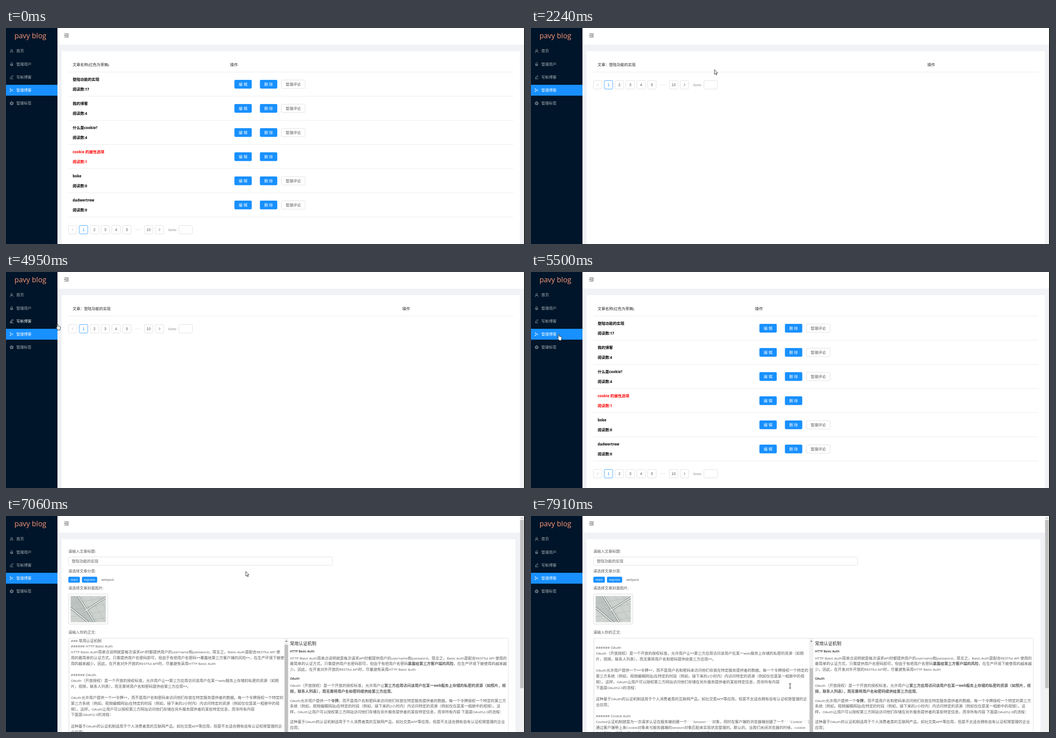
An HTML page that plays this animation: 1160 by 483 pixels, repeating every 7.99 s.

```html
<!DOCTYPE html>
<html lang="zh-CN">
<head>
<meta charset="utf-8">
<title>Blog admin</title>
<style>
html, body { margin: 0; width: 100%; height: 100%; overflow: hidden; background: #fff; }
svg { display: block; width: 1160px; height: 483px; }
text { font-family: "Open Sans", "Noto Sans CJK SC", "Noto Sans CJK", sans-serif; white-space: pre; }
.num { font-family: "Liberation Sans", Arial, sans-serif; }
</style>
</head>
<body>
<svg id="stage" viewBox="0 0 1160 483" xmlns="http://www.w3.org/2000/svg"></svg>
<script>
const LOOP = 7990, BLUE = '#1890ff', GREY = '#595959', BORDER = '#d9d9d9';
const stage = document.getElementById('stage');

// ---------- drawing helpers ----------
const rect = (x, y, w, h, fill, extra = '') =>
  `<rect x="${x}" y="${y}" width="${w}" height="${h}" fill="${fill}" ${extra}/>`;
const path = (d, extra = '') => `<path d="${d}" ${extra}/>`;
const line = (d, stroke, width) => path(d, `fill="none" stroke="${stroke}" stroke-width="${width}"`);
const box = (x, y, w, h, stroke = BORDER, fill = '#fff') =>
  rect(x, y, w, h, fill, `rx="2.2" stroke="${stroke}" stroke-width=".8"`);
const triangleUp = (x, y, fill) => path(`M${x - 2.3} ${y}l2.3 -2.6l2.3 2.6Z`, `fill="${fill}"`);

// Latin runs are set a little smaller than the Han characters beside them.
function runs(str, size) {
  const safe = str.replace(/&/g, '&amp;').replace(/</g, '&lt;');
  return safe.replace(/[\x20-\x7e]+/g, s => `<tspan font-size="${(size * 0.94).toFixed(2)}">${s}</tspan>`);
}
function text(x, cy, str, { size = 8.5, fill = GREY, weight = 400, anchor = 'start', bold = false } = {}) {
  const body = bold
    ? str.split('**').map((s, i) => `<tspan font-weight="${i % 2 ? 700 : 400}">${runs(s, size)}</tspan>`).join('')
    : runs(str, size);
  return `<text x="${x}" y="${cy + size * 0.37}" font-size="${size}" fill="${fill}" font-weight="${weight}" text-anchor="${anchor}">${body}</text>`;
}
const number = (x, cy, str, fill) =>
  `<text class="num" x="${x}" y="${cy + 3.1}" font-size="8.5" fill="${fill}" text-anchor="middle">${str}</text>`;

// ---------- frame of the page ----------
const ring = (x, y, r) => `M${x - r} ${y}a${r} ${r} 0 1 0 ${2 * r} 0a${r} ${r} 0 1 0 ${-2 * r} 0`;
const corner = (i, r) => {
  const a = i * Math.PI * 0.4;
  return `${(r * Math.sin(a)).toFixed(2)} ${(-r * Math.cos(a)).toFixed(2)}`;
};
const pentagon = r => 'M' + [0, 1, 2, 3, 4].map(i => corner(i, r)).join('L') + 'Z';
const spokes = [0, 1, 2, 3, 4].map(i => `M${corner(i, 2)}L${corner(i, 4)}`).join('');

const menu = [
  ['首页', 'M-3.5 4a3.5 3.4 0 0 1 7 0' + ring(0, -1.6, 2)],
  ['管理用户', 'M-1.7 1.5V-2Q0 -5.6 1.7 -2V1.5ZM-1.7 0L-3 2.6H3L1.7 0M-.8 4H.8'],
  ['写新博客', 'M-3.8 3.8H3.8M-2.7 2L-2.3 .2L2 -4L3.6 -2.4L-.8 1.7Z'],
  ['管理博客', 'M-2 -2L3.5 2.2M-2 2L3.5 -2.2' + ring(-2.8, -2.6, 1.1) + ring(-2.8, 2.6, 1.1)],
  ['管理标签', pentagon(4) + pentagon(2) + spokes]
];
const SELECTED = 3;
const menuY = i => 51.2 + 29.2 * i;

const sidebar = () => rect(0, 0, 115, 483, '#001529') + rect(0, 127, 115, 24.3, BLUE) +
  text(54.5, 17, 'pavy blog', { size: 17, fill: '#fa9778', anchor: 'middle' }) +
  menu.map(([label, icon], i) => `<g class="menu"><g transform="translate(12.6 ${menuY(i) + .3})">` +
    line(icon, '#fff', .8) + '</g>' +
    text(23, menuY(i), label, { fill: '#fff', weight: i === SELECTED ? 500 : 400 }) + '</g>').join('');

const header = () => rect(115, 0, 1045, 483, '#f0f2f5') + rect(115, 0, 1043, 37.3, '#fff') + '<g id="fold">' +
  [0, 1, 2, 3].map(i => line(`M${i % 3 ? 134 : 130.3} ${12.9 + 2.5 * i}H140.2`, 'currentColor', .9)).join('') +
  path('M130.2 16.6l2.6 -1.9v3.8Z', 'fill="currentColor"') + '</g>';

// ---------- table pages ----------
const rule = y => rect(139, y, 995, .8, '#e8e8e8');
const tableHead = (title, actionX) => rect(124.5, 51.8, 1024, 432, '#fff') +
  text(149, 82.3, title, { fill: '#262626' }) + text(actionX, 82.3, '操作', { fill: '#262626' }) + rule(98);

function pagination(y) {
  const cy = y + 9.8;
  const slot = i => 139.5 + 24.25 * i;
  const cells = ['', '1', '2', '3', '4', '5', null, '10', ''].map((label, i) => {
    if (label === null) return [-4, 0, 4].map(d => `<circle cx="${294.8 + d}" cy="${cy}" r=".8" fill="#bfbfbf"/>`).join('');
    const on = i === 1;
    return box(slot(i), y + .3, 19, 19, on ? BLUE : BORDER) + number(slot(i) + 9.5, cy, label, on ? BLUE : GREY);
  }).join('');
  const chevron = (x, dx, stroke) => line(`M${x} ${cy - 2.7}l${dx} 2.7l${-dx} 2.7`, stroke, .9);
  return cells + chevron(150.6, -3, '#bfbfbf') + chevron(341.6, 3, GREY) +
    text(362.5, cy, 'Goto', { fill: '#7a7a7a' }) + box(386.5, y + .3, 30, 19);
}

const posts = [['登陆功能的实现', 17], ['我的博客', 4], ['什么是cookie?', 4], ['cookie 的属性选项', 1, true], ['boke', 0], ['dadwertrew', 0]];

function button(x, y, w, label, primary, id = '') {
  return `<g ${id && `id="${id}"`} style="color:${primary ? BLUE : GREY}">` +
    (primary ? rect(x, y, w, 19.4, 'currentColor', 'rx="2.4"') : box(x + .4, y + .4, w - .8, 18.6)) +
    text(x + w / 2, y + 9.8, label, { fill: primary ? '#fff' : 'currentColor', weight: primary ? 500 : 400, anchor: 'middle' }) + '</g>';
}

const listPage = () => tableHead('文章名称(红色为草稿)', 501) + posts.map(([title, reads, draft], i) => {
  const y = 98 + 54 * i, style = { fill: draft ? '#f00' : '#000', weight: 700 };
  return text(149, y + 17.2, title, style) + text(149, y + 38.4, '阅读数:' + reads, style) +
    button(510.5, y + 18, 38.8, '编 辑', true, i ? '' : 'edit') + button(567.5, y + 18, 38.8, '删 除', true) +
    (draft ? '' : button(615, y + 18, 54, '管理评论', false, i ? '' : 'comment')) + rule(y + 54);
}).join('') + pagination(441.2);

const commentPage = () => tableHead('文章：登陆功能的实现', 886) + pagination(117.2);

// ---------- editor page ----------
const source = `### 常用认证机制
###### HTTP Basic Auth
HTTP Basic Auth简单点说明就是每次请求API时都提供用户的username和password，简言之，Basic Auth是配合RESTful API 使
用的最简单的认证方式，只需提供用户名密码即可，但由于有把用户名密码**暴露给第三方客户端的风险**，在生产环境下被使
用的越来越少。因此，在开发对外开放的RESTful API时，尽量避免采用HTTP Basic Auth

###### OAuth
OAuth（开放授权）是一个开放的授权标准，允许用户让**第三方应用访问该用户在某一web服务上存储的私密的资源（如照
片，视频，联系人列表），而无需将用户名和密码提供给第三方应用**。

OAuth允许用户提供一个**令牌**，而不是用户名和密码来访问他们存放在特定服务提供者的数据。每一个令牌授权一个特定的
第三方系统（例如，视频编辑网站)在特定的时段（例如，接下来的2小时内）内访问特定的资源（例如仅仅是某一相册中的视
频）。这样，OAuth让用户可以授权第三方网站访问他们存储在另外服务提供者的某些特定信息，而非所有内容
下面是OAuth2.0的流程：

这种基于OAuth的认证机制适用于个人消费者类的互联网产品，如社交类APP等应用，但是不太适合拥有自有认证权限管理的企
业应用；

###### Cookie Auth
Cookie认证机制就是为一次请求认证在服务端创建一个\`\`\`Session\`\`\`对象，同时在客户端的浏览器端创建了一个\`\`\`Cookie\`\`\`对象;
通过客户端带上来Cookie对象来与服务器端的session对象匹配来实现状态管理的。默认的，当我们关闭浏览器的时候，cookie
会被删除。但可以通过修改cookie 的expire time使cookie在一定时间内有效`.split('\n');

const preview = [
  [317.5, `HTTP Basic Auth简单点说明就是每次请求API时都提供用户的username和password，简言之，Basic Auth是配合RESTful API 使用的
最简单的认证方式，只需提供用户名密码即可，但由于有把用户名密码**暴露给第三方客户端的风险**，在生产环境下被使用的越来越
少。因此，在开发对外开放的RESTful API时，尽量避免采用HTTP Basic Auth`],
  [379, `OAuth（开放授权）是一个开放的授权标准，允许用户让**第三方应用访问该用户在某一web服务上存储的私密的资源（如照片，视**
**频，联系人列表），而无需将用户名和密码提供给第三方应用。**`],
  [412.5, `OAuth允许用户提供一个**令牌**，而不是用户名和密码来访问他们存放在特定服务提供者的数据。每一个令牌授权一个特定的第三方
系统（例如，视频编辑网站)在特定的时段（例如，接下来的2小时内）内访问特定的资源（例如仅仅是某一相册中的视频）。这
样，OAuth让用户可以授权第三方网站访问他们存储在另外服务提供者的某些特定信息，而非所有内容 下面是OAuth2.0的流程：`],
  [460, `这种基于OAuth的认证机制适用于个人消费者类的互联网产品，如社交类APP等应用，但是不太适合拥有自有认证权限管理的企业
应用；`]
];
const LINE = 12.75;

function photo() {
  const beams = 'M161 179L198 238M144 205L184 238M223 182L175 213';
  const grid = [0, 1, 2, 3].map(i => `M144 ${196 + 15 * i}l80 -14M${152 + 18 * i} 179l34 59`).join('');
  return '<g clip-path="url(#photoClip)">' + rect(144, 179, 80, 59, '#cdd2cf') +
    path('M144 179H161L198 238H184L144 205Z', 'fill="#bcc3c0"') +
    line(grid, '#a9b1ae', .6) + line(beams, '#6c7776', 4.4) + line(beams, '#eceeea', 2.4) + '</g>';
}

function tag(x, w, label) {
  return rect(x, 135.7, w, 13.2, BLUE, 'rx="2.2"') +
    text(x + w / 2, 142.3, label, { size: 7.3, fill: '#fff', weight: 500, anchor: 'middle' });
}

const editorForm = () => rect(1138.5, 37.3, 10, 446, '#f0f2f5') + rect(124.5, 51.8, 1014, 432, '#fff') +
  rect(1148.3, 0, 9.7, 483, '#f1f1f1') + rect(1149.2, 9, 7.9, 376, '#c1c1c1') + triangleUp(1153.2, 6, '#a3a3a3') +
  text(139.3, 78.8, '请输入文章标题:') + box(139.5, 91.5, 590, 18.6) + text(147, 101, '登陆功能的实现') +
  text(139.3, 123.2, '请选择文章分类:') + tag(139.3, 25.8, 'react') + tag(169.8, 34, 'express') +
  text(213, 142.3, 'webpack', { size: 7.3 }) +
  text(139.3, 161.3, '请选择文章封面图片:') + box(139.7, 174, 88, 68, BORDER, '#fafafa') + photo();

const subhead = (y, label) => text(634.7, y, label, { size: 7.4, fill: '#262626', weight: 600 });
const lines = (x, y, rows, style) => rows.map((row, i) => text(x, y + LINE * i, row, style)).join('');

const editorBody = () => text(139.3, 260.2, '请输入你的正文:') + box(139.7, 273.3, 983, 240) +
  line('M142.2 274V483', '#e3e3e3', .7) +
  `<g clip-path="url(#sourceClip)"><g id="source">${lines(145, 278.5, source)}</g></g>` +
  rect(622, 274, 9, 209, '#f1f1f1') + triangleUp(626.6, 281, '#505050') +
  rect(622.6, 0, 7.9, 240, '#c1c1c1', 'id="thumb"') +
  text(634.7, 285.2, '常用认证机制', { size: 9.8, fill: '#262626', weight: 500 }) +
  subhead(302.3, 'HTTP Basic Auth') + subhead(363.4, 'OAuth') +
  preview.map(([y, para]) => lines(634.7, y, para.split('\n'), { bold: true })).join('');

// ---------- pointer ----------
const solid = d => path(d, 'fill="#fff" stroke="#000" stroke-width=".8"');
const pointerShapes = {
  arrow: solid('M0 0V10.4L2.4 8.3L4 11.9L5.6 11.2L4 7.7H7.2Z'),
  hand: solid('M-1 1Q0 -.6 1.1 1V4.6L5.6 5.8Q7 6.4 6.8 8L5.9 11.6V14H0V12.2L-3 8.4Q-2.6 6.6 -1 8.2Z'),
  beam: line('M-2.3 -5H2.3M0 -5V5M-2.3 5H2.3', '#000', .9)
};

// Each move: start, end, then waypoints as [step, x, y].
const moves = [
  [290, 980, [1, 1040, 456], [7, 590, 128], [10, 622, 101]],
  [1150, 1470, [5, 642, 122]],
  [2170, 2940, [2, 410, 93], [11, 139, 20]],
  [3020, 3170, [3, 138, 22]],
  [3400, 4180, [3, 86, 41], [11, 50, 140]],
  [4260, 4260, [1, 49, 139]],
  [4640, 5410, [2, 78, 121], [5, 115, 116], [11, 62, 139]],
  [5730, 6510, [3, 210, 192], [9, 546, 133], [11, 541, 124]],
  [6580, 6900, [1, 539, 119], [5, 536, 117]],
  [7060, 7060, [1, 536, 124]],
  [7210, 7910, [7, 573, 373], [10, 579, 380]]
];
const clamp = u => Math.max(0, Math.min(1, u));

// The screen was sampled about every 78 ms, so the pointer moves in steps.
function stepAt(t, start, end) {
  const gaps = Math.round((end - start) / 77.5);
  return gaps ? Math.min(gaps + 1, Math.floor((t - start) / (end - start) * gaps + 1.2)) : 1;
}

function pointerAt(t) {
  let at = null;
  for (const [start, end, ...points] of moves) {
    if (t < start) break;
    const step = stepAt(t, start, end);
    let from = [0, ...(at || points[0].slice(1))];
    for (const to of points) {
      const u = clamp((step - from[0]) / (to[0] - from[0]));
      at = [from[1] + (to[1] - from[1]) * u, from[2] + (to[2] - from[2]) * u];
      if (step <= to[0]) break;
      from = to;
    }
  }
  return at;
}

const pageAt = t => t < 1700 ? 'list' : t < 5500 ? 'comments' : t < 7060 ? 'list' : 'editor';
const inside = (p, x, y, w, h) => p && p[0] >= x && p[0] <= x + w && p[1] >= y && p[1] <= y + h;
const targets = {
  fold: p => inside(p, 128, 10, 15, 16),
  edit: (p, page) => page === 'list' && inside(p, 510, 116, 39, 19.4),
  comment: (p, page) => page === 'list' && inside(p, 615, 116, 54, 19.4)
};
menu.forEach((_, i) => { targets['menu' + i] = p => inside(p, 0, menuY(i) - 12.2, 117, 24.4); });

// Hover colours fade over 300 ms, so average the recent hover state.
function hover(name, t) {
  let sum = 0;
  for (let i = 0; i < 6; i++) sum += targets[name](pointerAt(t - i * 50), pageAt(t - i * 50)) ? 1 : 0;
  return sum / 6;
}

function pointerShape(p, page) {
  if (page === 'editor') return inside(p, 142, 274, 480, 209) ? 'beam' : 'arrow';
  const onMenu = inside(p, 0, 38, 117, 146);
  return onMenu || Object.values(targets).some(hit => hit(p, page)) ? 'hand' : 'arrow';
}

// ---------- build and animate ----------
const pages = { list: listPage, comments: commentPage, editor: () => editorForm() + editorBody() };
const clip = (id, ...area) => `<clipPath id="${id}">${rect(...area, '#fff')}</clipPath>`;
const groups = (entries, render) => Object.entries(entries).map(([id, v]) => `<g id="${id}">${render(v)}</g>`).join('');
stage.innerHTML = clip('photoClip', 144.7, 179, 78.3, 58.3) + clip('sourceClip', 142, 274, 480, 209) +
  header() + groups(pages, build => build()) + rect(1158, 0, 2, 483, '#111') + sidebar() +
  `<g id="pointer">${groups(pointerShapes, shape => shape)}</g>`;

const el = id => document.getElementById(id);
const show = (id, on) => { el(id).style.display = on ? '' : 'none'; };
const mix = (to, from, amount) => `color-mix(in srgb, ${to} ${Math.round(amount * 100)}%, ${from})`;
const menuItems = [...document.querySelectorAll('.menu')];

function draw(t) {
  const page = pageAt(t), p = pointerAt(t);
  for (const id in pages) show(id, id === page);

  el('fold').style.color = mix(BLUE, '#404040', hover('fold', t));
  el('edit').style.color = mix('#40a9ff', BLUE, hover('edit', t));
  const over = hover('comment', t);
  el('comment').style.color = mix('#40a9ff', GREY, over);
  el('comment').querySelector('rect').style.stroke = mix('#40a9ff', BORDER, over);
  menuItems.forEach((m, i) => { m.style.opacity = i === SELECTED ? 1 : 0.65 + 0.35 * hover('menu' + i, t); });

  const held = 7210 + (stepAt(t, 7210, 7910) - 1) * 700 / 9;
  const u = clamp((held - 7596) / 314);
  const scroll = 60.7 * u * u * (3 - 2 * u);
  el('source').setAttribute('transform', `translate(0 ${-scroll})`);
  el('thumb').setAttribute('y', 288 + scroll * 0.86);

  show('pointer', p);
  if (!p) return;
  const shape = pointerShape(p, page);
  for (const id in pointerShapes) show(id, id === shape);
  el('pointer').setAttribute('transform', `translate(${p[0]} ${p[1]})`);
}

const began = performance.now();
function tick() {
  draw((performance.now() - began) % LOOP);
  requestAnimationFrame(tick);
}
tick();
</script>
</body>
</html>
```
